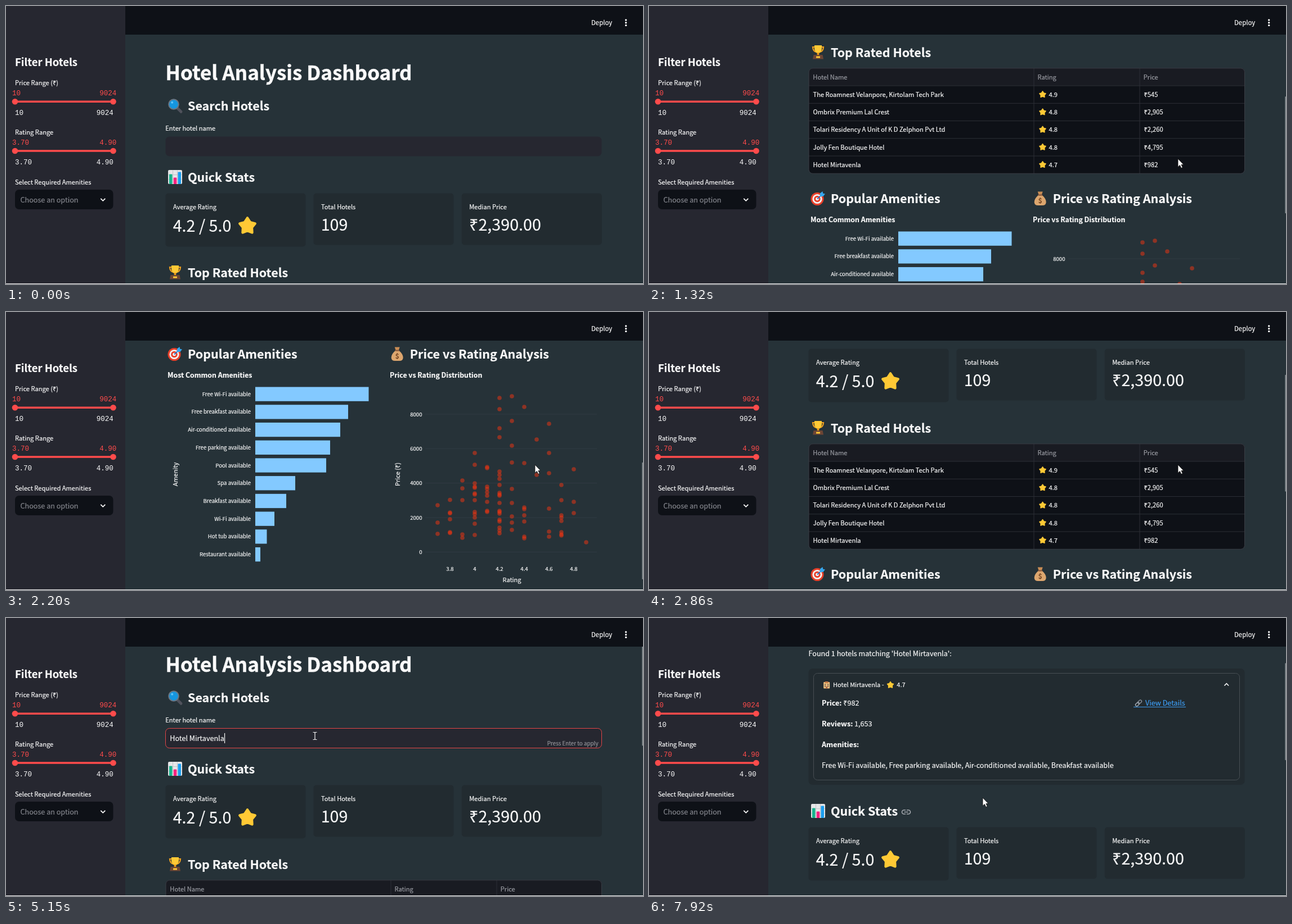
Write an HTML page that moves like this. It is 1132 px wide and 495 px high and loops after 7.99 s.

```html
<!DOCTYPE html>
<html lang="en">
<head>
<meta charset="utf-8">
<title>Hotel Analysis Dashboard</title>
<style>
html, body { margin: 0; width: 100%; height: 100%; overflow: hidden; background: #263238; }
svg { display: block; width: 100vw; height: 100vh; }
text { font-family: "Noto Sans CJK SC", "Noto Sans CJK JP", "Noto Sans", sans-serif; white-space: pre;
  fill: var(--ink, #fafafa); stroke: var(--ink, #fafafa); stroke-width: 0.2px; }
.mono { font-family: "Liberation Mono", "DejaVu Sans Mono", monospace; stroke-width: 0; }
.title { stroke-width: 0.5px; }
</style>
</head>
<body>
<svg id="stage" viewBox="0 0 1132 495" xmlns="http://www.w3.org/2000/svg"></svg>
<script>
const LOOP = 7990;
const RED = '#ff4b4b', DARK = '#0e1117', PANEL = '#262730', CARD = '#222b30', GOLD = '#ffc935';
const SMALL = 11.12, BODY = 12.6, TICK = 9.6;
const HOTEL = 'Hotel Mirtavenla';

// ---- drawing helpers ----
const text = (x, y, size, str, attrs = '') => `<text x="${x}" y="${y}" font-size="${size}" ${attrs}>${str}</text>`;
const bold = (x, y, size, str, attrs = '') => text(x, y, size, str, 'font-weight="700" ' + attrs);
const ink = color => `style="--ink:${color}"`;
const rect = (x, y, w, h, fill, r = 0, attrs = '') => `<rect x="${x}" y="${y}" width="${w}" height="${h}" rx="${r}" fill="${fill}" ${attrs}/>`;
const circle = (x, y, r, fill, attrs = '') => `<circle cx="${x}" cy="${y}" r="${r}" fill="${fill}" ${attrs}/>`;
const line = (d, color, w = 1, attrs = '') => `<path d="${d}" fill="none" stroke="${color}" stroke-width="${w}" ${attrs}/>`;
const shape = (d, fill, attrs = '') => `<path d="${d}" fill="${fill}" ${attrs}/>`;
const group = (id, body, attrs = '') => `<g id="${id}" ${attrs}>${body}</g>`;
const at = (x, y, body, s = 1) => `<g transform="translate(${x} ${y}) scale(${s})">${body}</g>`;
const END = 'text-anchor="end"', MID = 'text-anchor="middle"', ROUND = 'stroke-linecap="round" stroke-linejoin="round"';

function star(x, y, r) {
  let d = '';
  for (let i = 0; i < 10; i++) {
    const a = i * Math.PI / 5, q = i % 2 ? r * 0.5 : r * 0.86;
    d += (i ? 'L' : 'M') + (x + q * Math.sin(a)).toFixed(2) + ' ' + (y - q * Math.cos(a)).toFixed(2);
  }
  return shape(d + 'Z', GOLD, `stroke="${GOLD}" stroke-width="${r * 0.26}" stroke-linejoin="round"`);
}

// ---- pictograms, each centred on 0,0 ----
const lens = line('M3 3L10.5 10.5', '#50525c', 5, ROUND) + circle(-2.5, -2.8, 8.8, '#1596e0', 'stroke="#6b7683" stroke-width="2"') +
  circle(-5.3, -6, 2, '#5cc3fa');
const chart = rect(-12.5, -12.5, 25, 25, '#e6e6e8', 2) + line('M-12 -4H12M-12 4H12M-4 -12V12M4 -12V12', '#c2c4ca', 1) +
  rect(-10.5, -5, 5.5, 17.5, '#16b38c', 1) + rect(-2.7, 1, 5.5, 11.5, '#f8207f', 1) + rect(5, -9, 5.5, 21.5, '#1b9ff0', 1);
const trophy = line('M-5 -9H-9.5Q-9 -1 -3 0M5 -9H9.5Q9 -1 3 0', '#f0a020', 2.2) +
  shape('M-6.5 -12H6.5V-5Q5 2 0 2.5Q-5 2 -6.5 -5Z', GOLD) + rect(-1.8, 1, 3.6, 5, '#e89a1c') +
  shape('M-8 5H8L9.5 12.5H-9.5Z', '#6d4534') + rect(-3.5, 7.5, 7, 3, GOLD, 0.5);
const target = circle(-1.5, 1, 11.5, '#e8402a') + circle(-1.5, 1, 8.6, '#f4f4f4') + circle(-1.5, 1, 5.8, '#e8402a') + circle(-1.5, 1, 2.8, '#f4f4f4') +
  line('M-1.5 1L6 -6', '#2f77c9', 2) + shape('M3.5 -4V-9L8 -12.5L8.8 -8.8L12.5 -8L9 -3.5H4Z', '#35a7ee');
const bag = shape('M-4.5 -12H4.5L2.5 -6H-2.5Z', '#c98d55') + shape('M-3 -6H3Q11 1 10.5 7Q10 12.5 4 12.5H-4Q-10 12.5 -10.5 7Q-11 1 -3 -6Z', '#dda66e') +
  rect(-4, -7, 8, 2.2, '#8a5a3c', 1) + bold(0, 8.2, 12, '$', MID + ' ' + ink('#7a4a26'));
const building = rect(-5.5, -5.5, 11, 11.5, '#e8bd7c', 1) + rect(-3, -6.5, 6, 3, '#c47a48', 1) +
  line('M-3.5 -1H-1.5M1.5 -1H3.5M-3.5 2H-1.5M1.5 2H3.5', '#6a5a58', 1.8) + rect(-1.1, 2.5, 2.2, 3.5, '#a8583c');
const chain = '<g transform="rotate(-45)">' + rect(-8, -2.7, 9, 5.4, 'none', 2.7, 'stroke="#aab0b8" stroke-width="1.6"') +
  rect(-1, -2.7, 9, 5.4, 'none', 2.7, 'stroke="#8b929c" stroke-width="1.6"') + '</g>';
const anchorIcon = line('M-1.5 -3.5H-4A3.5 3.5 0 0 0 -4 3.5H-1.5M1.5 -3.5H4A3.5 3.5 0 0 1 4 3.5H1.5M-3 0H3', '#a9adb3', 1.6, ROUND);

const heading = (x, y, icon, str) => at(x + 16.5, y - 8.5, icon) + bold(x + 39, y, 21.5, str);

// ---- page parts ----
function topPart() {
  return bold(283.5, 132, 35, 'Hotel Analysis Dashboard', 'class="title"') + heading(284, 186.3, lens, 'Search Hotels') +
    text(283.3, 222, SMALL, 'Enter hotel name') +
    rect(283.5, 232.5, 775, 35, PANEL, 7, 'id="field" stroke-width="0.88"') + text(291.3, 254.8, BODY, '', 'id="typed"') +
    rect(0, 241, 1.2, 18, '#fafafa', 0, 'id="caret"') +
    text(1052.5, 262.7, 9.8, 'Press Enter to apply', END + ' id="hint" ' + ink('#94959b'));
}

function resultPart() {
  const row = (y, key, val) => `<text x="307" y="${y}" font-size="${BODY}"><tspan font-weight="700">${key}</tspan>${val}</text>`;
  return text(283.5, 68, BODY, `Found 1 hotels matching '${HOTEL}':`) +
    rect(283.5, 90, 775, 207, CARD, 7, 'id="resCard"') +
    rect(292.5, 98.5, 757, 190, 'none', 7, 'id="resBox" stroke="#474e53"') +
    at(315.7, 119.5, building) + text(327, 123.3, 11, `${HOTEL} - `, 'class="hov"') + star(429, 119.3, 6.6) +
    text(440.3, 123.3, 11, '4.7', 'class="hov"') +
    line('M1022.5 120.5L1026.3 116.7L1030.1 120.5', '#fafafa', 1.6, 'id="chev"') +
    group('resBody', row(156.3, 'Price:', ' ₹982') + row(193, 'Reviews:', ' 1,653') + row(230, 'Amenities:', '') +
      text(307, 267.3, BODY, 'Free Wi-Fi available, Free parking available, Air-conditioned available, Breakfast available') +
      at(870, 151.5, chain, 0.85) + text(882, 156.3, BODY, 'View Details', ink('#3d9df3')) +
      line('M861 158.5H954', '#3d9df3'), 'clip-path="url(#resClip)"');
}

function statsPart() {
  const cards = [[283.5, 95, 'Average Rating', '4.2 / 5.0', 402.3], [546.5, 92, 'Total Hotels', '109', 399.6], [809.8, 92, 'Median Price', '₹2,390.00', 399.6]];
  return heading(284, 313, chart, 'Quick Stats') + group('anchor', at(457, 306.5, anchorIcon)) +
    cards.map(([x, h, label, val, y]) => rect(x, 333.5, 249, h, CARD, 5) + text(x + 13.5, 361.8, SMALL, label) + text(x + 13.2, y, 28.7, val)).join('') +
    star(429, 391.8, 16.8);
}

function tablePart() {
  const rows = [['The Roamnest Velanpore, Kirtolam Tech Park', '4.9', '545'], ['Ombrix Premium Lal Crest', '4.8', '2,905'],
    ['Tolari Residency A Unit of K D Zelphon Pvt Ltd', '4.8', '2,260'], ['Jolly Fen Boutique Hotel', '4.8', '4,795'], [HOTEL, '4.7', '982']];
  const y0 = 502.8, h = 31.25, grey = ink('#9a9ca3');
  let s = heading(284, 482.5, trophy, 'Top Rated Hotels') + rect(284, y0, 774.5, h * 6, DARK, 7) +
    shape(`M284 ${y0 + h}V${y0 + 7}Q284 ${y0} 291 ${y0}H1051.5Q1058.5 ${y0} 1058.5 ${y0 + 7}V${y0 + h}Z`, '#191b22') +
    text(291.3, y0 + 19.7, SMALL, 'Hotel Name', grey) + text(690.5, y0 + 19.7, SMALL, 'Rating', grey) + text(878.8, y0 + 19.7, SMALL, 'Price', grey);
  rows.forEach(([name, rate, price], i) => {
    const y = y0 + h * (i + 1);
    s += line(`M284 ${y}H1058.5`, '#2c2f36') + text(291.5, y + 19.7, SMALL, name) + star(699.5, y + 15.6, 6.6) +
      text(710.5, y + 19.7, SMALL, rate) + text(879.5, y + 19.7, SMALL, '₹' + price);
  });
  return s + line(`M684 ${y0}v${h * 6}M872 ${y0}v${h * 6}`, '#2c2f36') + rect(284, y0, 774.5, h * 6, 'none', 7, 'stroke="#3a3d45"');
}

function chartPart() {
  const bars = [['Free Wi-Fi', 201.5], ['Free breakfast', 165], ['Air-conditioned', 151], ['Free parking', 133], ['Pool', 126],
    ['Spa', 71], ['Breakfast', 55], ['Wi-Fi', 34], ['Hot tub', 20.5], ['Restaurant', 9]];
  // heights of the dots, one row per rating step
  const dots = [[415, 446, 466], [405.5, 428, 429.5, 440, 463, 464.5], [371, 385, 406, 467, 473],
    [322, 343, 376, 382, 384, 394, 396, 406, 427, 431, 437, 448, 468], [347, 349, 382, 386, 392, 398, 409, 425, 427],
    [224, 244, 278, 294, 355, 361, 368, 379, 393, 396, 398, 411, 425, 427, 430, 441, 444, 455, 460, 465],
    [221, 265, 309, 339, 386, 411, 435, 446, 459], [240, 340, 419, 422, 433, 444, 471, 474], [298, 361],
    [270, 322, 358, 421, 462, 471], [379, 406, 433, 437, 443, 463, 467, 469], [351, 409, 429], [481]];
  let s = heading(284, 743, target, 'Popular Amenities') + heading(678.7, 743, bag, 'Price vs Rating Analysis') +
    bold(287, 776.8, 12.3, 'Most Common Amenities') + bold(682, 776.8, 12.3, 'Price vs Rating Distribution');
  bars.forEach(([name, w], i) => {
    const y = 793.5 + 31.72 * i;
    s += rect(443, y, w, 25.3, '#83c9ff') + text(435, y + 16.2, TICK, name + ' available', END);
  });
  s += `<g transform="translate(0 589)">`;
  for (let i = 0; i < 5; i++) {
    const y = 253 + 61.35 * i;
    s += line(`M745 ${y}H1050`, '#303b43') + text(739.5, y + 3.6, TICK, 8000 - 2000 * i, END);
  }
  dots.forEach((col, i) => col.forEach(y => { s += circle(767 + 22 * i, y, 3.8, '#f5330f', 'opacity="0.5"'); }));
  for (let i = 0; i < 6; i++) s += text(789 + 44 * i, 532, TICK, +(3.8 + 0.2 * i).toFixed(1), MID);
  s += text(899, 552, 11, 'Rating', MID) + '</g>';
  const side = (x, str) => `<g transform="translate(${x} 949) rotate(-90)">${text(0, 0, 11, str, MID)}</g>`;
  return s + side(305, 'Amenity') + side(700, 'Price (₹)');
}

function slider(y, label, lo, hi) {
  const num = (x, dy, str, color, extra = '') => text(x, y + dy, 12.5, str, `class="mono" ${ink(color)} ${extra}`);
  return text(16, y - 29, SMALL, label) + num(11, -11, lo, RED) + num(196.3, -11, hi, RED, END) +
    line(`M16 ${y}H190.5`, RED, 3.5) + circle(16, y, 5.3, RED) + circle(190.5, y, 5.3, RED) +
    num(16, 23.8, lo, '#fafafa') + num(190.8, 23.8, hi, '#fafafa', END);
}

function chrome() {
  return rect(212, 0, 920, 51, DARK) + text(1040, 34, 11.4, 'Deploy') + [25, 29.7, 34.4].map(y => circle(1101.7, y, 1.7, '#fafafa')).join('') +
    rect(0, 0, 212, 495, PANEL) + bold(16, 107, 18.5, 'Filter Hotels') +
    slider(170.3, 'Price Range (₹)', '10', '9024') + slider(258, 'Rating Range', '3.70', '4.90') +
    text(16, 317.5, SMALL, 'Select Required Amenities') + rect(16, 327, 174.5, 35, DARK, 7) +
    text(25.5, 349.5, BODY, 'Choose an option', ink('#83858c')) + line('M168.3 342.8L172.3 346.8L176.3 342.8', '#fafafa', 1.8) +
    rect(0, 494, 1132, 1, '#f4f4f4');
}

const arrow = shape('M0 0V14.5L3.4 11.4L5.8 16.6L8.2 15.5L5.9 10.5H10Z', '#fff', 'stroke="#111" stroke-width="0.8"');
const beam = line('M-3.5 -6.5H-1L0 -5.5L1 -6.5H3.5M0 -5.5V5.5M-3.5 6.5H-1L0 5.5L1 6.5H3.5', '#f2f2f2', 1.2);
const hand = shape('M-1.5 1Q0 -1 1.5 1V6.5L6.5 7.5Q8.5 8 8 10.5L7 16H0L-4.5 10.5Q-4.5 8 -1.5 9.5Z', '#fff', 'stroke="#111" stroke-width="0.8"');

const stage = document.getElementById('stage');
stage.innerHTML = '<defs><clipPath id="resClip"><rect id="clipRect" x="292" y="140" width="758" height="150"/></clipPath></defs>' +
  rect(0, 0, 1132, 495, '#263238') +
  group('page', topPart() + group('result', resultPart(), 'transform="translate(0 229.5)"') + group('below', statsPart() + tablePart() + chartPart())) +
  rect(1130.4, 0, 1.6, 10, '#8b9195', 0.8, 'id="thumb"') + chrome() +
  group('pointer', group('arrow', arrow) + group('beam', beam) + group('hand', hand));

const el = {};
stage.querySelectorAll('[id]').forEach(e => { el[e.id] = e; });
const hovered = stage.querySelectorAll('.hov');

// ---- motion ----
const clamp = v => Math.max(0, Math.min(1, v));
const smooth = v => v * v * (3 - 2 * v);
const span = (t, a, b) => clamp((t - a) / (b - a));
const SCROLL = [[0, 0], [720, 0], [780, 14], [900, 90], [1320, 392], [1380, 392], [1450, 435], [1840, 589], [1910, 589], [1980, 615], [2200, 660],
  [2680, 660], [2730, 560], [2860, 268], [2930, 268], [3000, 240], [3470, 99], [3540, 82.5], [3660, 82.5], [3680, 62], [3740, 48],
  [3860, 48], [3950, 36], [7020, 36], [7200, 100], [7420, 210], [7540, 229.5]];

function scrollAt(t) {
  const i = SCROLL.findIndex(k => k[0] > t);
  if (i < 0) return SCROLL[SCROLL.length - 1][1];
  const [a, u] = SCROLL[i - 1], [b, v] = SCROLL[i];
  return u + (v - u) * (t - a) / (b - a);
}

function pointerAt(t) {
  const legs = [[320, 510, 1110, 440, 940, 272], [3880, 4410, 940, 272, 549, 210], [6220, 6620, 549, 210, 593, 320]];
  const [a, b, x, y, x2, y2] = legs.filter(l => t >= l[0]).pop() || legs[0];
  const p = smooth(span(t, a, b));
  return [x + (x2 - x) * p, y + (y2 - y) * p];
}

const show = (e, on) => e.setAttribute('visibility', on ? 'visible' : 'hidden');
const move = (e, x, y) => e.setAttribute('transform', `translate(${x.toFixed(2)} ${y.toFixed(2)})`);

function draw(t) {
  const s = scrollAt(t), found = t >= 5600;
  const open = 1 - (1 - span(t, 6740, 7020)) ** 3;
  const shift = found ? 120.5 + 148 * open : 0;
  move(el.page, 0, -s);
  move(el.below, 0, shift);

  const n = Math.floor(HOTEL.length * span(t, 4640, 5150));
  const typed = HOTEL.slice(0, n);
  if (el.typed.textContent !== typed) el.typed.textContent = typed;
  el.caret.setAttribute('x', 291.5 + (n ? el.typed.getComputedTextLength() : 0));
  show(el.caret, t >= 4610 && t < 5950);
  show(el.hint, n > 0 && t < 5550);
  el.field.setAttribute('stroke', t >= 4610 && t < 6770 ? RED : 'none');

  el.result.setAttribute('display', found ? 'inline' : 'none');
  el.resCard.setAttribute('height', 59 + 148 * open);
  el.resBox.setAttribute('height', 42 + 148 * open);
  el.clipRect.setAttribute('height', 148 * open);
  el.chev.setAttribute('transform', open < 0.5 ? 'rotate(180 1026.3 118.6)' : '');

  const [x, y] = pointerAt(t);
  const over = found && y > 328 - s && y < 370 - s;
  hovered.forEach(e => e.style.setProperty('--ink', over ? RED : '#fafafa'));
  el.chev.setAttribute('stroke', over ? RED : '#fafafa');
  show(el.anchor, t >= 7420);

  const inField = t > 4000 && y > 232.5 - s && y < 267.5 - s;
  move(el.pointer, x, y);
  el.pointer.setAttribute('display', t >= 320 ? 'inline' : 'none');
  show(el.beam, inField);
  show(el.hand, over);
  show(el.arrow, !inField && !over);

  const total = 1243 + shift;
  el.thumb.setAttribute('y', 5 + s * 495 / total);
  el.thumb.setAttribute('height', 495 * 495 / total + 11);
  show(el.thumb, t >= 320);
}

const start = performance.now();
function tick() {
  draw((performance.now() - start) % LOOP);
  requestAnimationFrame(tick);
}
draw(0);
requestAnimationFrame(tick);
</script>
</body>
</html>
```
